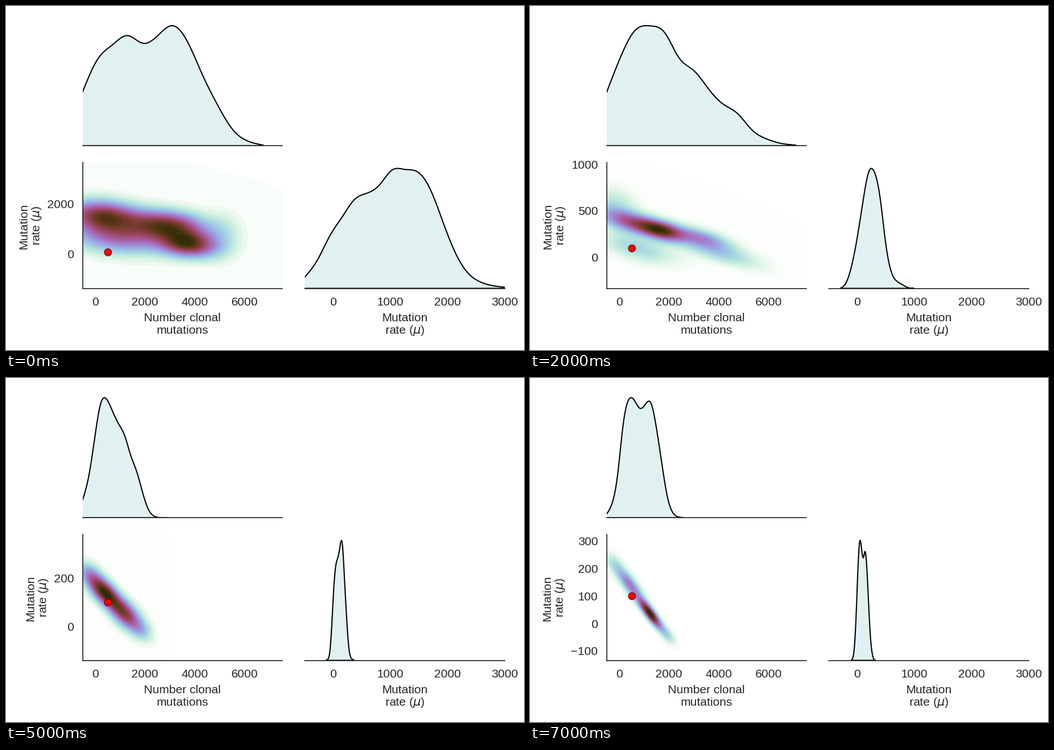
Write a matplotlib script that moves like this. It is 917 by 611 pixels and loops after 8 s.

```python
import numpy as np
import matplotlib.pyplot as plt
from matplotlib.animation import FuncAnimation
from matplotlib.colors import ListedColormap
from matplotlib.patches import Rectangle

plt.rcParams["font.family"] = "Liberation Sans"
plt.rcParams["mathtext.fontset"] = "dejavusans"

W, H, DPI = 917, 611, 100
INK = "#262626"
FILL = "#e1f0f1"
FONT = 15.2
DIGIT, MINUS = 11.73, 12.3
LEFT, RIGHT = (135.5, 489.0), (529.0, 882.5)
TOP_BASE, LOW_TOP, LOW_BASE = 248.0, 278.0, 501.5
PANEL_H = LOW_BASE - LOW_TOP
PEAK = 213


def helix(n=256, start=1.9, rot=-1.0, light=1.0, dark=0.15):
    """Cubehelix colours running from white to dark olive."""
    x = np.linspace(light, dark, n)
    phi = 2 * np.pi * (start / 3 + rot * x)
    amp = x * (1 - x) / 2
    mix = np.array([[-0.14861, 1.78277], [-0.29227, -0.90649], [1.97294, 0]])
    rgb = x + amp * (mix @ np.array([np.cos(phi), np.sin(phi)]))
    return ListedColormap(np.clip(rgb.T, 0, 1))


CMAP = helix()


def hill_shape(span, heights, base):
    """Closed outline under a natural spline through evenly spaced heights."""
    v = np.array(heights, float)
    n = len(v)
    bend = np.zeros(n)
    system = 4 * np.eye(n - 2) + np.eye(n - 2, k=1) + np.eye(n - 2, k=-1)
    bend[1:-1] = np.linalg.solve(system, 6 * np.diff(v, 2))
    # open ends run on past the panel, where they are clipped
    t = np.linspace(-0.3 if v[0] > 1 else 0, n - 1 + (0.3 if v[-1] > 1 else 0), 500)
    k = np.clip(t.astype(int), 0, n - 2)
    b = t - k
    a = 1 - b
    y = (a * v[k] + b * v[k + 1]
         + ((a ** 3 - a) * bend[k] + (b ** 3 - b) * bend[k + 1]) / 6)
    y = np.maximum(y, 0) * PEAK / y.max()
    x = span[0] + t * (span[1] - span[0]) / (n - 1)
    return np.r_[x, x[-1], x[0]], np.r_[base - y, base, base]


GX, GY = np.meshgrid(np.linspace(*LEFT, 236), np.linspace(LOW_TOP, LOW_BASE, 150))


def density(angle, blobs):
    """Sum of tilted Gaussians: weight, centre, long and short sigma."""
    c, s = np.cos(np.radians(angle)), np.sin(np.radians(angle))
    z = np.zeros_like(GX)
    for w, cx, cy, along, across in blobs:
        u = (GX - cx) * c + (GY - cy) * s
        v = (GY - cy) * c - (GX - cx) * s
        z += w * np.exp(-0.5 * ((u / along) ** 2 + (v / across) ** 2))
    return z / z.max()


def haze(*slope):
    """Faint region under a sloping right edge, or a box up to one x."""
    if len(slope) == 1:
        slope = [(slope[0], 278), (slope[0], 502)]
    return [(135, 502), (135, 278), *slope, (slope[-1][0], 502)]


def lerp(a, b, t):
    return np.array(a) * (1 - t) + np.array(b) * t


def between(a, b, t):
    """Blend the shapes of two rounds."""
    keys = ("angle", "blobs", "top_span", "top", "side_span", "side")
    return {k: lerp(a[k], b[k], t) for k in keys}


first = dict(
    ylim=(-1360, 3663), step=2000, levels=30,
    haze=haze((335, 278), (380, 295), (455, 311), (489, 328)),
    angle=5,
    blobs=[(.75, 170, 372, 45, 19), (.75, 287, 389, 48, 18), (.75, 325, 424, 35, 16),
           (.5, 200, 412, 60, 20), (.13, 385, 408, 22, 28)],
    top_span=(135.5, 455),
    top=[95, 153, 179, 195, 181.5, 195, 212.5, 183, 124, 71, 28, 8, 1],
    side_span=RIGHT,
    side=[20, 50, 93, 127, 158, 169, 184, 210, 211, 207, 178, 122, 66, 29, 12, 5, 2])

second = dict(
    ylim=(-647, 1847), step=500, levels=30, haze=haze(489), angle=12,
    blobs=[(.85, 342, 414, 36, 14), (.75, 190, 416, 33, 12), (.65, 262, 388, 42, 15),
           (.3, 172, 357, 45, 18), (.27, 400, 432, 30, 14), (.2, 150, 405, 25, 18)],
    top_span=LEFT,
    top=[122, 181, 210, 208, 190, 184, 184, 175, 142, 87, 38, 11, 3],
    side_span=(529, 760),
    side=[0, 2, 21, 75, 165, 211, 175, 148, 101, 64, 35, 17, 5, 1, 0])

third = dict(
    ylim=(-338, 1024), step=500, levels=60,
    haze=haze((205, 278), (345, 328), (489, 388)), angle=16,
    blobs=[(.85, 231, 398, 30, 11), (.55, 172, 382, 35, 13), (.42, 305, 412, 35, 10),
           (.25, 190, 430, 45, 14), (.27, 335, 438, 50, 11), (.17, 150, 350, 25, 18)],
    top_span=(135.5, 470),
    top=[94, 159, 205, 212, 200, 155, 133, 101, 74, 57, 28, 12, 4, 1],
    side_span=(549, 680),
    side=[0, 9, 38, 87, 148, 199, 200, 157, 78, 28, 12, 6, 1, 0])

fourth = dict(
    ylim=(-274, 792), step=250, levels=36, haze=haze(331), angle=39,
    blobs=[(.9, 231, 421, 24, 15), (.45, 163, 362, 28, 13), (.42, 195, 395, 35, 20),
           (.3, 215, 435, 40, 14)],
    top_span=(135.5, 325),
    top=[38, 87, 129, 171, 190, 210, 210, 197, 153, 96, 52, 18, 3, 0, 0],
    side_span=(554, 657),
    side=[0, 3, 26, 92, 189, 209, 175, 124, 102, 84, 42, 13, 3, 1, 0])

sixth = dict(
    ylim=(-139.5, 380), step=200, levels=36, haze=haze(290), angle=47,
    blobs=[(.72, 212, 420, 25, 13), (.3, 147, 347, 18, 12), (.9, 174, 380, 25, 12),
           (.2, 241, 449, 15, 11)],
    top_span=(135.5, 285),
    top=[31, 72, 140, 202, 210, 188, 166, 145, 110, 81, 43, 13, 2, 0, 0],
    side_span=(566, 617),
    side=[0, 2, 16, 67, 133, 171, 184, 204, 209, 153, 86, 31, 7, 2, 0])

eighth = dict(
    ylim=(-134, 324), step=100, levels=90, haze=haze((165, 278), (277, 480)), angle=53,
    blobs=[(1, 213, 419, 22, 5.5), (.14, 149, 329, 14, 8), (.52, 176, 366, 26, 7.5),
           (.2, 244, 457, 13, 6)],
    top_span=(135.5, 273),
    top=[6, 25, 75, 162, 205, 204, 190, 197, 199, 155, 92, 35, 8, 1, 0],
    side_span=(568, 612),
    side=[0, 4, 24, 82, 162, 210, 198, 181, 192, 163, 100, 43, 13, 2, 0])

fifth = between(fourth, sixth, 0.6)
fifth.update(ylim=(-160, 420), step=200, levels=36, haze=haze(306), side_span=(565, 618))
seventh = between(sixth, eighth, 0.5)
seventh.update(ylim=(-140, 340), step=100, levels=60, haze=haze(284))

rounds = [first, second, third, fourth, fifth, sixth, seventh, eighth]
for r in rounds:
    r["z"] = density(r["angle"], r["blobs"])

fig = plt.figure(figsize=(W / DPI, H / DPI), dpi=DPI, facecolor="white")
ax = fig.add_axes([0, 0, 1, 1])


def put(x, y, text, ha="center", rotation=0):
    ax.text(x, y, text, ha=ha, va="baseline", rotation=rotation,
            rotation_mode="anchor", fontsize=FONT, color=INK)


def clip(artist, span, base):
    artist.set_clip_path(Rectangle((span[0], base - PANEL_H), span[1] - span[0],
                                   PANEL_H, transform=ax.transData))


def spine(x, y):
    ax.plot(x, y, color=INK, lw=1.25, solid_capstyle="projecting", zorder=5)


def hill(span, heights, panel, base):
    shape, = ax.fill(*hill_shape(span, heights, base), fc=FILL, ec="black",
                     lw=1.5, zorder=3)
    clip(shape, panel, base)


def x_axis(span, low, high, ticks, lines):
    scale = (span[1] - span[0]) / (high - low)
    for v in ticks:
        put(span[0] + (v - low) * scale, 531.5, str(v))
    mid = sum(span) / 2
    put(mid, 559.5, lines[0])
    put(mid, 582.5, lines[1])


def y_axis(ylim, step):
    scale = PANEL_H / (ylim[1] - ylim[0])
    width = 0
    for v in np.arange(np.ceil(ylim[0] / step) * step, ylim[1], step):
        label = f"{int(v)}".replace("-", "\u2212")
        put(120.3, LOW_BASE - (v - ylim[0]) * scale + 7.5, label, "right")
        digits = len(label.lstrip("\u2212"))
        width = max(width, digits * DIGIT + (v < 0) * MINUS)
    x = 84.2 - width
    put(x, 391, "Mutation", rotation=90)
    put(x + 22.5, 390, r"rate ($\mu$)", rotation=90)


def draw(i):
    r = rounds[i]
    ax.clear()
    ax.set_xlim(0, W)
    ax.set_ylim(H, 0)
    ax.axis("off")

    hill(r["top_span"], r["top"], LEFT, TOP_BASE)
    hill(r["side_span"], r["side"], RIGHT, LOW_BASE)

    n = r["levels"]
    base, = ax.fill(*zip(*r["haze"]), fc=CMAP(0.5 / n), lw=0, zorder=1)
    clip(base, LEFT, LOW_BASE)
    ax.contourf(GX, GY, r["z"], levels=np.linspace(0, 1, n + 1)[1:], cmap=CMAP,
                vmin=0, vmax=1, zorder=2)

    low, high = r["ylim"]
    dot_y = LOW_BASE - (100 - low) * PANEL_H / (high - low)
    ax.plot(179.7, dot_y, "o", ms=9.2, mfc="red", mec="#400000", mew=0.7, zorder=4)

    spine(LEFT, [TOP_BASE] * 2)
    spine(LEFT, [LOW_BASE] * 2)
    spine(RIGHT, [LOW_BASE] * 2)
    spine([LEFT[0]] * 2, [LOW_TOP, LOW_BASE])

    x_axis(LEFT, -500, 7500, range(0, 7000, 2000), ("Number clonal", "mutations"))
    x_axis(RIGHT, -500, 3000, range(0, 3001, 1000), ("Mutation", r"rate ($\mu$)"))
    y_axis(r["ylim"], r["step"])
    return []


anim = FuncAnimation(fig, draw, frames=len(rounds), init_func=lambda: draw(0),
                     interval=1000, repeat=True, repeat_delay=0, blit=False)
plt.show()
```
